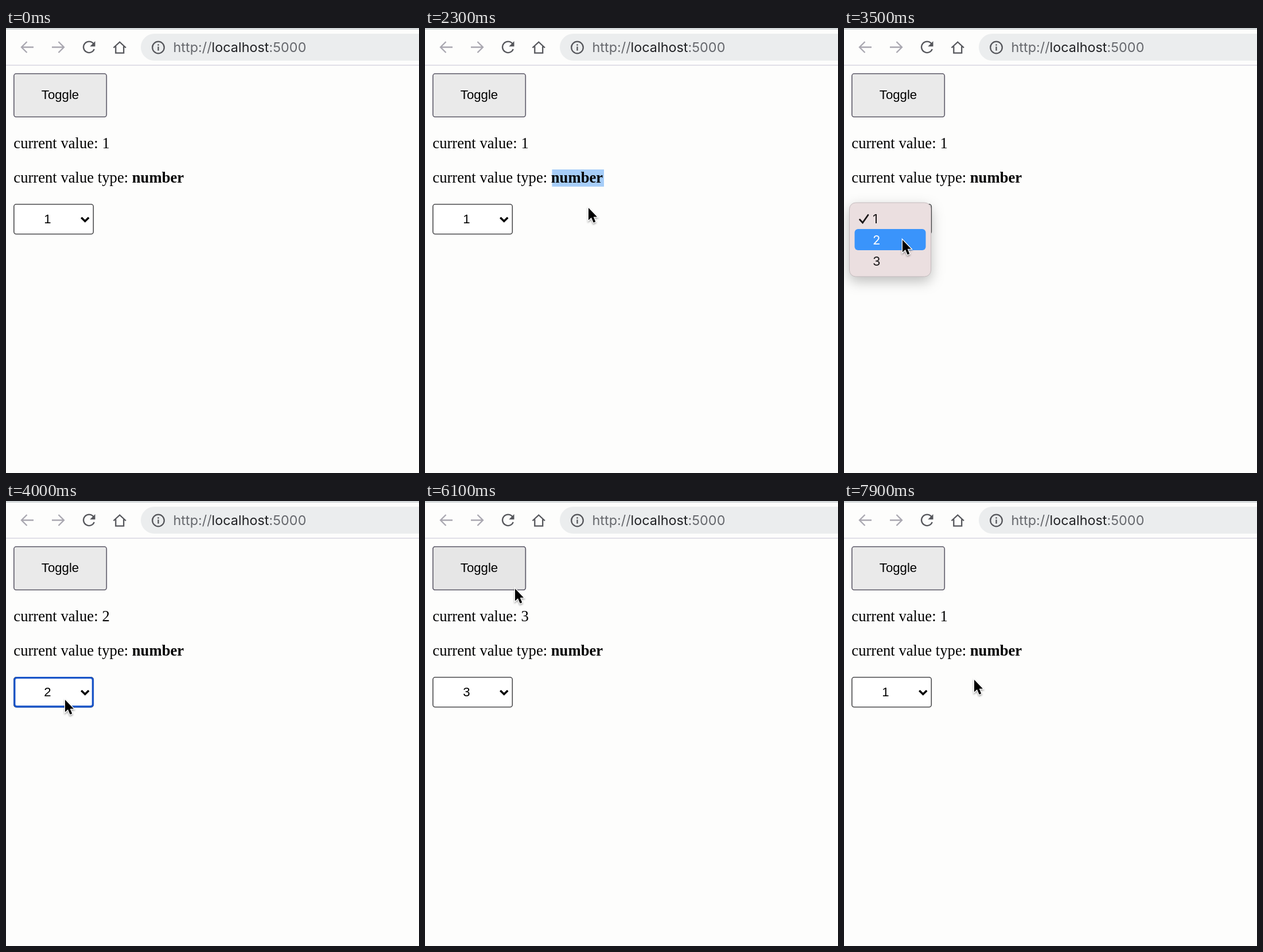
Animation of 720 by 777 pixels, one loop 8000 ms. Source, as an HTML page:

```html
<!DOCTYPE html>
<html lang="en">
<head>
<meta charset="utf-8">
<title>Toggle and select</title>
<style>
  html, body { margin: 0; width: 100%; height: 100%; overflow: hidden; background: #fdfdfc; }
  svg { display: block; width: 720px; height: 777px; }
  .page { font: 26.67px "Liberation Serif", serif; font-kerning: none; }
  .control { font: 22.2px "Liberation Sans", sans-serif; text-anchor: middle; }
  .url { font: 23.4px Inter, sans-serif; fill: #66686d; }
  .row { font: 22px Inter, sans-serif; fill: #1b1819; }
  .icon { fill: none; stroke: #55565b; stroke-width: 2.3; }
  .dim { stroke: #a9a7b0; }
  .button { x: 13.8px; y: 79.8px; width: 161.5px; height: 75.5px; rx: 4px; fill: #eaeaea; stroke: #5d5a68; stroke-width: 1.6px; }
  .hover { fill: #e6e6e6; }
  .press { fill: #f3f3f3; }
  .panel { fill: #ebdfe0; stroke: #c3babc; filter: drop-shadow(0 8px 11px rgba(0, 0, 0, .25)); }
  .cursor { filter: drop-shadow(0 2px 1.5px rgba(0, 0, 0, .35)); }
  .check { fill: none; stroke: #1b1819; stroke-width: 2.8; stroke-linecap: round; }
  .lit .row { fill: #fff; }
  .lit .check { stroke: #fff; }
</style>
</head>
<body>
<svg viewBox="0 0 720 777">
  <rect width="720" height="3" fill="#d4d8da"/>
  <rect y="64.3" width="720" height="1.4" fill="#d4d3df"/>

  <rect x="235" y="10" width="520" height="47" rx="23.5" fill="#ebedee"/>
  <g class="icon">
    <path class="dim" d="M48 33.5H27.5M36.5 24L27 33.5L36.5 43"/>
    <path class="dim" d="M80 33.5H100.5M91.5 24L101 33.5L91.5 43"/>
    <path d="M152.3 27.2A9.7 9.7 0 1 0 153.8 36.8"/>
    <path d="M155.5 23V32.2H146.3Z" fill="#55565b" stroke="none"/>
    <path d="M187.5 34.5L198.2 24.5L209 34.5M191.3 32V43.7H205.2V32"/>
    <circle cx="265.5" cy="34" r="10.3"/>
    <path d="M265.5 32.5V39.5M265.5 28.3V30.7"/>
  </g>
  <text class="url" x="291.5" y="42">http://<tspan fill="#202124">localhost</tspan>:5000</text>

  <rect class="button"/>
  <rect class="button hover"/>
  <rect class="button press"/>
  <text class="control" x="94.5" y="124">Toggle</text>

  <rect class="mark" x="221.5" y="247" width="90.5" height="30" fill="#a6cdf8"/>
  <g class="page">
    <text x="13.3" y="210">current value:</text>
    <text x="13.3" y="270">current value type: <tspan font-weight="bold">number</tspan></text>
  </g>

  <rect x="13.8" y="307.8" width="138.5" height="52" rx="4" fill="#fff" stroke="#4a4a4c" stroke-width="1.6"/>
  <rect class="focus" x="14.8" y="308.6" width="136.6" height="50.4" rx="4" fill="#fff" stroke="#1a55c8" stroke-width="3.3"/>
  <path d="M131.3 331L137.8 337.3L144.3 331" fill="none" stroke="#000" stroke-width="3.4"/>

  <g id="values"></g>
  <g id="menus"></g>

  <path class="cursor" d="M0 0V21.5L5 17L8.7 25.8L12.3 24.2L8.7 15.7H15Z" stroke="#fff" stroke-width="2.6" paint-order="stroke"/>
</svg>
<script>
const LOOP = 8000, TICK = 100, ROW = 37;
const options = [1, 2, 3];
const within = (v, from, to) => v >= from && v < to;

// Pointer glides: start, end, x, y
const glides = [
  [600, 800, 366, 521], [1100, 1700, 266, 258], [2100, 2300, 285, 314],
  [2300, 2700, 105, 332], [3100, 3500, 102, 370], [3800, 4000, 103, 347],
  [4300, 4800, 97, 376], [5000, 5300, 265, 258], [5400, 5800, 225, 343],
  [5800, 6100, 157, 153], [6100, 6400, 130, 122], [7100, 7900, 227, 312]
];
function pointer(t) {
  let x = 330, y = 470;
  for (const [start, end, toX, toY] of glides) {
    const p = Math.min(1, Math.max(0, (t - start) / (end - start)));
    const ease = p * p * (3 - 2 * p);
    x += (toX - x) * ease;
    y += (toY - y) * ease;
  }
  return { x, y };
}

// Each menu lies with its checked row over the select box.
const menus = [
  { name: "first", checked: 0, open: 2800, shut: 3600 },
  { name: "second", checked: 1, open: 4300, shut: 4800 }
].map(m => ({ ...m, top: 305 - ROW * m.checked }));

const value = t => t < 3700 || t >= 6500 ? 1 : t < 4900 ? 2 : 3;
const marked = t => within(t, 1800, 2800) || within(t, 5300, 5700);
const focused = t => within(t, 3800, 4300) || within(t, 4900, 5300);
const hovered = t => {
  const { x, y } = pointer(t);
  return within(x, 13, 176) && within(y, 79, 156);
};
const menuAlpha = (m, t) =>
  t < m.open ? 0 : t < m.shut ? 1 : Math.max(0, .75 - (t - m.shut) / 200);
const rowAt = (m, t) => Math.floor((pointer(t).y - m.top - 9) / ROW);

function rowMarkup(m, i) {
  const y = m.top + ROW * i;
  const check = i === m.checked ? '<path class="check" d="M27.5 334.5L32.5 340L42 326.5"/>' : "";
  const label = `<text class="row" x="50" y="${y + 36}">${i + 1}</text>${check}`;
  return `${label}<g class="lit ${m.name}-${i}">
    <rect x="18.5" y="${y + 9}" width="124" height="${ROW}" rx="6" fill="#3a94fb"/>${label}</g>`;
}
document.getElementById("menus").innerHTML = menus.map(m => `<g class="${m.name}">
  <rect class="panel" x="9.5" y="${m.top}" width="142" height="129" rx="11"/>
  ${options.map((_, i) => rowMarkup(m, i)).join("")}</g>`).join("");
document.getElementById("values").innerHTML = options.map(n => `<g class="value-${n}">
  <text class="page" x="167.4" y="210">${n}</text>
  <text class="control" x="72.5" y="341">${n}</text></g>`).join("");

// Samples a style rule once per tick; changes fall half a tick early, and
// the stepped timing then shows them exactly on the tick.
function play(selector, style) {
  const ticks = LOOP / TICK;
  const frames = Array.from({ length: ticks }, (_, k) => ({
    ...style(k * TICK), offset: Math.max(0, k - .5) / ticks, easing: "step-end"
  }));
  frames.push({ ...style(LOOP - TICK), offset: 1 });
  document.querySelector(selector).animate(frames,
    { duration: LOOP, iterations: Infinity, easing: `steps(${ticks}, end)` });
}
const show = (selector, test) => play(selector, t => ({ opacity: Number(test(t)) }));

options.forEach(n => show(`.value-${n}`, t => value(t) === n));
show(".mark", marked);
show(".focus", focused);
show(".hover", hovered);
show(".press", t => within(t, 6400, 6500));
for (const m of menus) {
  show(`.${m.name}`, t => menuAlpha(m, t));
  options.forEach((_, i) => show(`.${m.name}-${i}`, t => rowAt(m, t) === i));
}
play(".cursor", t => {
  const { x, y } = pointer(t);
  return { opacity: t < 600 ? 0 : 1, transform: `translate(${x}px, ${y}px)` };
});
</script>
</body>
</html>
```
